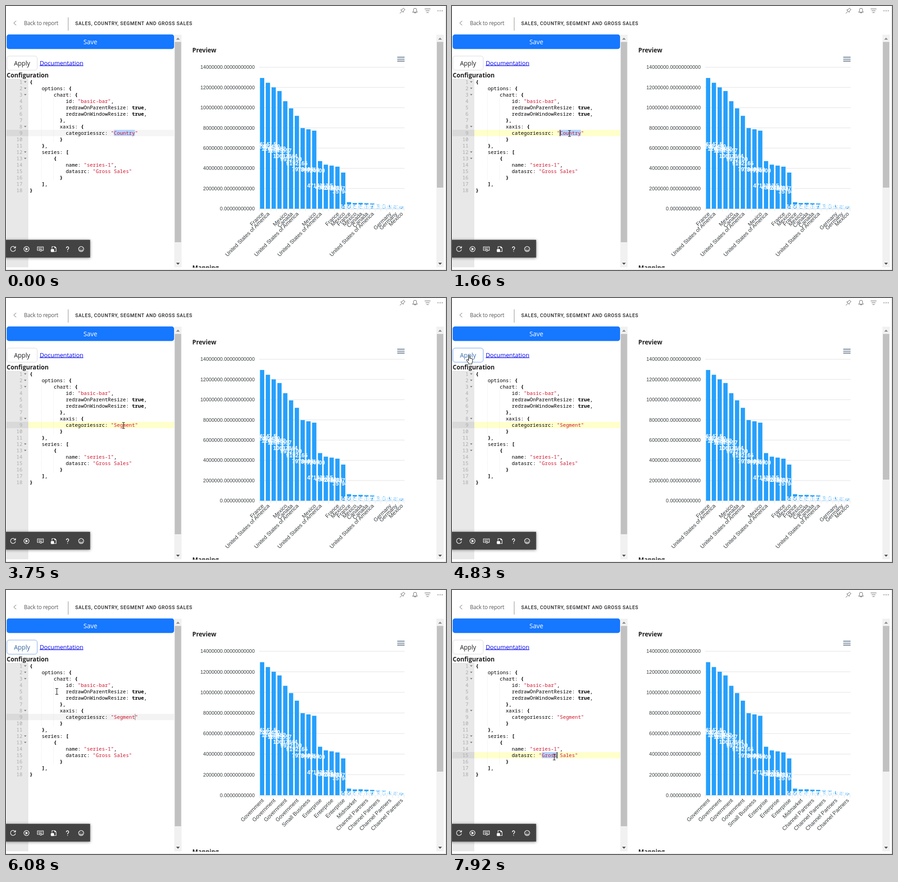
An HTML page for the animation above (8 s loop, 966 px wide and 580 px high).

```html
<!DOCTYPE html>
<html lang="en">
<head>
<meta charset="utf-8">
<title>Chart configuration editor</title>
<style>
html, body { margin: 0; width: 100%; height: 100%; overflow: hidden; background: #fff; }
svg { display: block; width: 100%; height: 100%; }
text { white-space: pre; }
.ui { font: 13.2px "Open Sans", "Noto Sans", sans-serif; fill: #1f1f1f; }
.bold { font-size: 13.4px; font-weight: 700; }
.back { font-size: 11.7px; letter-spacing: -.14px; fill: #555; }
.link { fill: #00e; text-decoration: underline; text-decoration-thickness: 1px; }
.title { font: 500 10.5px Roboto, sans-serif; letter-spacing: .72px; fill: #252423; }
.code { font: 11px "Noto Sans Mono", "DejaVu Sans Mono", monospace; fill: #000; }
.code .str { fill: #d0142c; }
.code .strong { font-weight: 700; }
.num { fill: #aaa; text-anchor: end; }
.axis { font: 11px "Liberation Sans", Arial, sans-serif; fill: #373d3f; text-anchor: end; }
.cat { font-size: 12px; }
.value { font: 700 12px "Liberation Sans", Arial, sans-serif; fill: #fff; text-anchor: middle; }
.icon { fill: none; stroke: #605e5c; stroke-width: 1; stroke-linecap: round; stroke-linejoin: round; }
.light { stroke: #fff; stroke-width: 1.2; }
</style>
</head>
<body>
<svg id="stage" viewBox="0 0 966 580"></svg>
<script>
const LOOP = 8000;
const CHAR = 6.6, CODE_X = 52, ROW_H = 14;
const LEFT = 556, RIGHT = 875, TOP = 134.5, SLOT = 12.72, BAR_W = 9.4;
const OLD_BASE = 445.4, NEW_BASE = 450.9, SWAP = 5240;

const values = [12936347.5, 12462450, 12008652, 11645557, 10637844, 9932100, 9192165,
  7978405, 7860850, 7724500, 4714312.5, 4362240, 4268185, 4163275, 3579450, 645568,
  565430, 580295, 541870, 517260, 432905, 428615, 384950, 336285, 250690];
const countries = { 0: 'France', 1: 'United States of America', 4: 'Mexico', 5: 'Canada',
  6: 'United States of America', 9: 'Mexico', 10: 'United States of America', 13: 'France',
  14: 'Mexico', 15: 'France', 16: 'Mexico', 17: 'Canada', 18: 'Canada',
  19: 'United States of America', 22: 'Germany', 23: 'Germany', 24: 'Mexico' };
const segments = { 0: 'Government', 2: 'Government', 4: 'Government', 6: 'Government',
  8: 'Small Business', 10: 'Enterprise', 12: 'Enterprise', 14: 'Enterprise', 16: 'Midmarket',
  18: 'Channel Partners', 20: 'Channel Partners', 22: 'Channel Partners', 24: 'Channel Partners' };

const source = `{
    options: {
        chart: {
            id: "basic-bar",
            redrawOnParentResize: true,
            redrawOnWindowResize: true,
          },
          xaxis: {
            categoriessrc: "Country"
          }
    },
    series: [
        {
            name: "series-1",
            datasrc: "Gross Sales"
          }
    ],
}`.split('\n');

// Timelines: [ms, value]
const words = [[0, 'Country'], [2140, 'S'], [2340, 'Se'], [2540, 'Seg'], [2810, 'Segm'],
  [2920, 'Segme'], [3030, 'Segmen'], [3140, 'Segment']];
const lineFill = [[0, '#f5f5f5'], [1580, '#ffffcc'], [5030, '#f3f3f3'], [7500, '#ffffcc']];
const caretAlpha = [[0, 0], [1580, 1], [3750, 0], [4150, 1], [4630, 0], [5030, .4], [7500, 1]];
const picked = [[0, 0], [7710, 1], [7780, 2], [7850, 4], [7920, 5]];
const pointer = [[520, 345, 420], [860, 289, 310], [930, 287.5, 306], [1270, 287.5, 306.5],
  [1580, 258, 280], [4150, 258, 280], [4480, 57, 150], [4630, 54, 148], [4830, 38, 134],
  [5870, 38, 134], [6080, 111.5, 223], [6300, 125, 195], [6640, 118, 154], [6840, 118, 154],
  [7460, 200, 366], [7640, 200, 366], [7920, 224.5, 367]];
const hover = [[4680, 0], [4880, 1], [6010, 1], [6220, 0]];

const row = n => 160 + ROW_H * (n - 1);
const col = c => CODE_X + CHAR * c;
const center = i => LEFT + SLOT * (i + .5);
const barHeight = (v, base) => v / 14e6 * (base - TOP);
const clamp = x => Math.max(0, Math.min(1, x));
const lerp = (a, b, k) => a + (b - a) * k;
const mix = (a, b, k) => `rgb(${a.map((v, i) => Math.round(lerp(v, b[i], k)))})`;
const rect = (x, y, w, h, fill, more = '') =>
  `<rect x="${x}" y="${y}" width="${w}" height="${h}" fill="${fill}" ${more}/>`;
const text = (x, y, cls, s, more = '') => `<text x="${x}" y="${y}" class="${cls}" ${more}>${s}</text>`;
const path = (d, more = '') => `<path d="${d}" ${more}/>`;

function stepAt(table, t) {
  let value = table[0][1];
  for (const [ms, v] of table) if (ms <= t) value = v;
  return value;
}

function glide(table, t) {
  const next = table.findIndex(p => p[0] > t);
  if (next < 0) return table.at(-1).slice(1);
  if (next === 0) return table[0].slice(1);
  const a = table[next - 1], b = table[next], k = (t - a[0]) / (b[0] - a[0]);
  return a.slice(1).map((v, i) => lerp(v, b[i + 1], k));
}

const paint = line => line.replace(/"[^"]*"|[{}[\]]|true/g,
  m => `<tspan class="${m[0] === '"' ? 'str' : 'strong'}">${m}</tspan>`);

function axes(base, cats) {
  let s = '';
  for (let i = 0; i <= 7; i++) {
    const y = lerp(base, TOP, i / 7);
    s += path(`M${LEFT} ${y}H${RIGHT}`, 'stroke="#e0e0e0"');
    s += text(546, y + 3.8, 'axis', (i * 2e6) + '.' + '0'.repeat(11));
  }
  for (let i = 0; i <= 25; i++)
    s += path(`M${LEFT + SLOT * i} ${base}v6`, 'stroke="#e0e0e0" stroke-width=".8"');
  for (const i in cats) {
    const x = center(+i) + 4.5, y = base + 12.2;
    s += text(x, y, 'axis cat', cats[i], `transform="rotate(-45 ${x} ${y})"`);
  }
  return s;
}

// Value labels sit mid-bar but never sink below the baseline.
const labels = (base, shift) => values.map((v, i) =>
  text(center(i), base + shift - Math.max(7, barHeight(v, base) / 2), 'value', v)).join('');

function scrollbar(x, thumbH) {
  const c = x + 8;
  return rect(x, 63, 16, 511, '#f1f1f1') + rect(x + 1, 79, 14, thumbH, '#c1c1c1') +
    path(`M${c - 4} 74l4-4.5 4 4.5z`, 'fill="#8a8a8a"') +
    path(`M${c - 4} 564l4 4.5 4-4.5z`, 'fill="#505050"');
}

function header() {
  return path('M22 33l-5 4.500 5 4.500', 'class="icon"') +
    text(39.5, 42, 'ui back', 'Back to report') +
    path('M136.500 25V54', 'stroke="#8a8886"') +
    text(152, 41.5, 'title', 'SALES, COUNTRY, SEGMENT AND GROSS SALES') +
    `<g class="icon">` +
    path('M865 16l4-4M867 9l5 5 .5-3 3.500-3-3.500-3.500-3 3.500z') +
    path('M893 13.500h10l-1.500-2.500V8.500a3.500 3.500 0 0 0-7 0V11zM896.500 14a1.600 1.600 0 0 0 3.200 0') +
    path('M919.500 6.500h12M921.500 10.500h8M923.500 14.500h4') + `</g>` +
    [948.5, 953, 957.5].map(x => `<circle cx="${x}" cy="10.500" r="1" fill="#605e5c"/>`).join('');
}

function toolbar() {
  return `<g style="filter:drop-shadow(0 1px 3px #0007)">` + rect(-4, 513.7, 188.7, 39, '#434343') + `</g>
  <g class="icon light">` +
    path('M20.500 531.500a5.500 5.500 0 1 0 .3 3.500M21 528v3.700h-3.700') +
    '<circle cx="45" cy="534" r="5.600"/>' + path('M43.500 531.500v5l4-2.500z', 'fill="#fff"') +
    path('M73 537h-4v-8h13v8h-3M71.500 531.500h8M71.500 534h3') +
    '<circle cx="76.500" cy="536.500" r="2.200"/>' +
    path('M101 533v-4.500h6l3 3v8h-5M107 528.500v3h3') +
    rect(99, 534.5, 6, 5.5, '#fff', 'rx="1"') +
    path('M132.500 531.500a2.600 2.600 0 1 1 4 2.200q-1.300 .8-1.300 2.300M135.200 539v.2', 'stroke-width="1.500"') +
    '<circle cx="165" cy="534" r="5.600"/>' +
    path('M162 535.500q3 3.500 6 0M163 532v.3M167 532v.3') + `</g>`;
}

function editor() {
  let s = rect(1, 160, 48, 414, '#e8e8e8') +
    rect(1, 0, 48, ROW_H, '#d9d9d9', 'id="gutterLine"') + rect(49, 0, 320, ROW_H, '#f5f5f5', 'id="line"') +
    rect(0, 0, 0, 13.5, '#b5d5ff', 'id="selection"');
  source.forEach((line, i) => {
    const y = row(i + 1), base = y + 11, indent = line.search(/\S/);
    for (let c = 4; c < indent; c += 4)
      s += path(`M${col(c) - .5} ${y}v14`, 'stroke="#ddd" stroke-width=".7" stroke-dasharray="1 1"');
    s += text(36, base, 'code num', i + 1);
    if (/[{[]$/.test(line)) s += path(`M39.500 ${y + 5.5}h5.500l-2.750 3z`, 'fill="#777"');
    s += text(CODE_X, base, 'code', paint(line), `id="row${i + 1}"`);
  });
  return s + rect(0, 0, 1.3, ROW_H, '#000', 'id="caret"');
}

const stage = document.getElementById('stage');
stage.innerHTML = `<defs>
    <clipPath id="plot">${rect(LEFT, 130, 319, 325, '#000')}</clipPath>
    <clipPath id="pane">${rect(386, 63, 560, 512, '#000')}</clipPath>
  </defs>` +
  rect(0, 0, 966, 580, '#fff') +
  path('M965.500 0V580M0 579.500H966', 'stroke="#dcdcdc"') +
  header() +
  rect(1.5, 62.5, 367.5, 32, '#1677ff', 'rx="5"') +
  text(185.2, 84, 'ui', 'Save', 'style="fill:#fff;font-size:14px;text-anchor:middle"') +
  rect(2, 110, 66.5, 31, '#fff', 'rx="5" id="applyBox"') +
  text(35.2, 131, 'ui', 'Apply', 'id="applyText" style="font-size:13.6px;text-anchor:middle"') +
  text(74, 129.5, 'ui link', 'Documentation') +
  text(1.5, 156.7, 'ui bold', 'Configuration') +
  editor() + scrollbar(369.5, 440) + scrollbar(945, 320) +
  text(409, 101.7, 'ui bold', 'Preview') +
  `<g clip-path="url(#pane)">${text(409, 579.5, 'ui bold', 'Mapping')}</g>` +
  path('M859 112.500h16M859 116.800h16M859 121h16', 'stroke="#6e8192" stroke-width="1.800"') +
  `<g id="oldAxes">${axes(OLD_BASE, countries)}</g><g id="newAxes">${axes(NEW_BASE, segments)}</g>` +
  `<g id="bars">${values.map((v, i) => rect(center(i) - BAR_W / 2 - .1, 0, BAR_W, 0, '#26a0fc')).join('')}</g>` +
  `<g clip-path="url(#plot)"><g id="oldLabels">${labels(OLD_BASE, 6.3)}</g>
   <g id="newLabels">${labels(NEW_BASE, 7.3)}</g></g>` +
  toolbar() +
  `<g id="beam">${path('M-3-6.500h2.200l.8 .7 .8-.7H3M-3 6.500h2.200l.8-.7 .8 .7H3M0-6V6',
    'fill="none" stroke="#222" stroke-width="1.200"')}</g>
   <g id="hand">${path('M-1.500-7q1.500-1.200 2.500 0v5.500q1.500-.8 2.200.4 1.600-.6 2.200.6 1.800-.3 1.800 1.500v4.500l-1.500 3.500v2h-7v-2L-5.500 4q-1.200-2.200.6-2.700 1.500 0 3.400 2.200z',
    'fill="#fff" stroke="#222" stroke-width="1.100" stroke-linejoin="round"')}</g>`;

const el = {};
stage.querySelectorAll('[id]').forEach(node => el[node.id] = node);
const set = (node, attrs) => { for (const k in attrs) node.setAttribute(k, attrs[k]); };
const show = (node, on) => set(node, { visibility: on ? 'visible' : 'hidden' });

let shownWord = 'Country';
function drawEditor(t) {
  const word = stepAt(words, t), count = stepAt(picked, t);
  const second = t >= 7500, y = row(second ? 15 : 9);
  if (word !== shownWord) {
    el.row9.innerHTML = paint(source[8].replace('Country', word));
    shownWord = word;
  }
  set(el.line, { y, fill: stepAt(lineFill, t) });
  set(el.gutterLine, { y });
  const selected = second ? count : t < 2140 ? 7 : 0;
  set(el.selection, { x: col(second ? 22 : 28), y, width: selected * CHAR });
  const caretCol = second ? 22 + count : t < 2140 ? 28 : 28 + word.length;
  set(el.caret, { x: col(caretCol) - .2, y, opacity: stepAt(caretAlpha, t) });
}

function drawChart(t) {
  const swapped = t >= SWAP;
  show(el.oldAxes, !swapped); show(el.oldLabels, !swapped);
  show(el.newAxes, swapped); show(el.newLabels, swapped);
  values.forEach((v, i) => {
    const p = clamp((t - 5290 - i * 14) / 350), k = 1 - (1 - p) ** 2;
    const height = lerp(barHeight(v, OLD_BASE), barHeight(v, NEW_BASE), k);
    set(el.bars.children[i], { y: lerp(OLD_BASE, NEW_BASE, k) - height, height });
  });
}

function drawPointer(t) {
  const [x, y] = glide(pointer, t), [k] = glide(hover, t);
  const onButton = x < 68 && y > 110 && y < 141;
  for (const node of [el.beam, el.hand]) set(node, { transform: `translate(${x} ${y})` });
  show(el.beam, t >= 520 && !onButton);
  show(el.hand, t >= 520 && onButton);
  set(el.applyBox, { stroke: mix([217, 217, 217], [64, 140, 245], k) });
  el.applyText.style.fill = mix([31, 31, 31], [64, 135, 225], k);
}

const start = performance.now();
function frame() {
  const t = (performance.now() - start) % LOOP;
  drawEditor(t);
  drawChart(t);
  drawPointer(t);
  requestAnimationFrame(frame);
}
frame();
</script>
</body>
</html>
```
